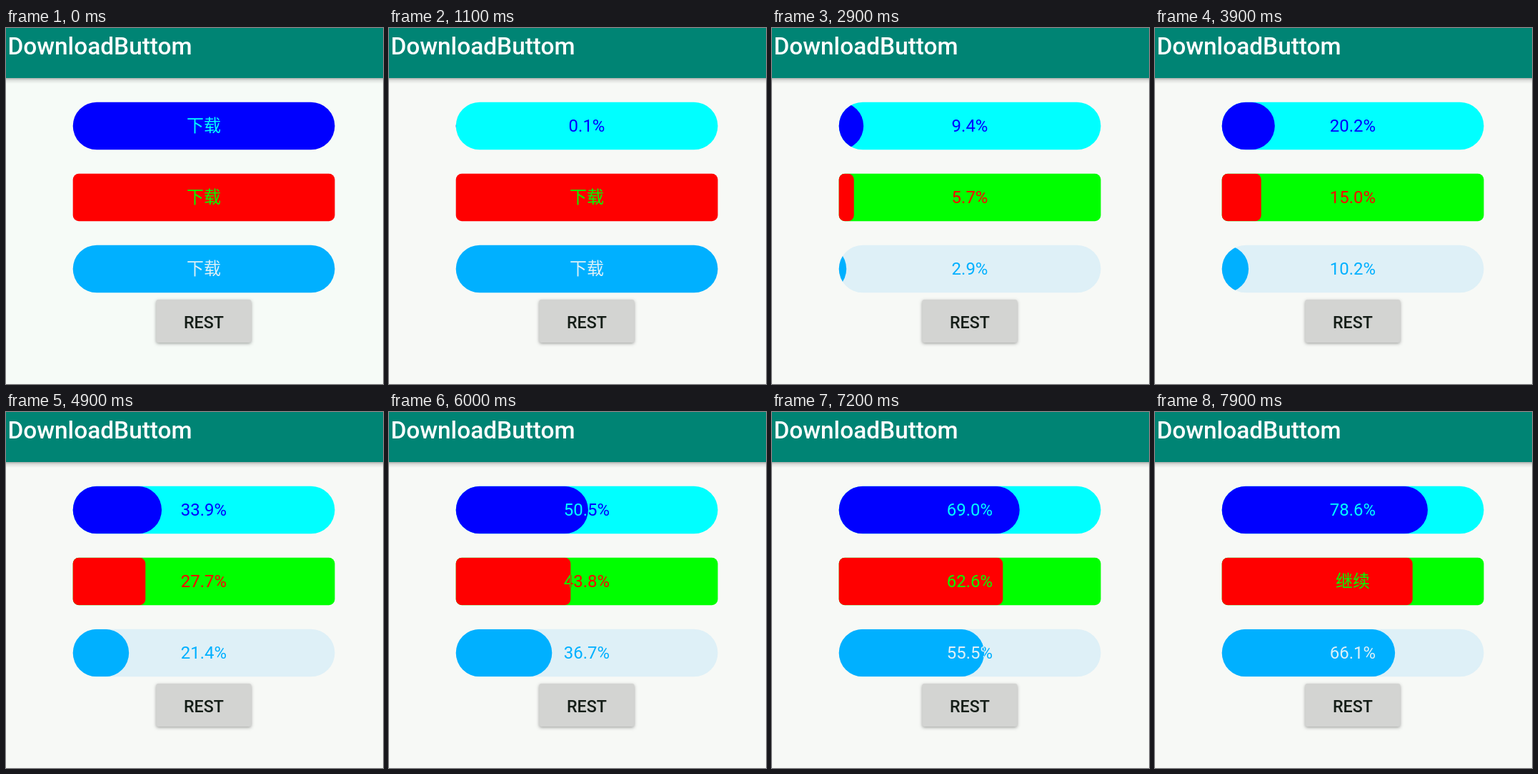
An HTML page with a canvas for the animation above (8 s loop, 528 by 498 pixels).

```html
<!DOCTYPE html>
<html lang="zh-CN">
<head>
<meta charset="utf-8">
<title>DownloadButtom</title>
<style>
html, body { margin: 0; width: 100%; height: 100%; overflow: hidden; background: #f7f9f6; }
canvas { display: block; }
</style>
</head>
<body>
<canvas id="stage" width="528" height="498"></canvas>
<script>
const ctx = document.getElementById('stage').getContext('2d');
const LOOP = 8000, STEP = 100;
const X = 93.7, W = 366.8, H = 66.6, MID = 277;
const FONT = 'Roboto, "Noto Sans CJK SC", "Noto Sans CJK", sans-serif';
const TIMES = [1800, 3900, 4900, 6000, 7200, 7900];

// Each bar eases from 0 to 100 percent; values are the readings at TIMES.
const bars = [
  { y: 103.7, r: 33.3, front: '#0000ff', back: '#00ffff', start: 890,
    values: [2, 20.2, 33.9, 50.5, 69, 78.6] },
  { y: 203.7, r: 8.3, front: '#ff0000', back: '#00ff00', start: 1350, pause: 7900,
    values: [0.5, 15, 27.7, 43.8, 62.6, 72.8] },
  { y: 303.7, r: 33.3, front: '#00b0ff', back: '#def0f7', start: 1800,
    values: [0, 10.2, 21.4, 36.7, 55.5, 66.1] }
];

const toPhase = v => Math.acos(1 - v / 50) / Math.PI;
const toValue = u => 50 * (1 - Math.cos(Math.PI * u));

for (const bar of bars) {
  bar.keys = TIMES.map((t, i) => [t, toPhase(bar.values[i])]);
  if (bar.start < TIMES[0]) bar.keys.unshift([bar.start, 0]);
}

function percentAt(keys, t) {
  let i = 1;
  while (i < keys.length - 1 && t > keys[i][0]) i++;
  const [t0, u0] = keys[i - 1], [t1, u1] = keys[i];
  return toValue(u0 + (u1 - u0) * (t - t0) / (t1 - t0));
}

function roundRect(x, y, w, h, r) {
  ctx.beginPath();
  ctx.roundRect(x, y, w, h, r);
}

function text(str, x, y, size, color, weight = 400, align = 'center') {
  ctx.font = `${weight} ${size}px ${FONT}`;
  ctx.textAlign = align;
  ctx.fillStyle = color;
  ctx.fillText(str, x, y);
}

function clipped(x, w, draw) {
  ctx.save();
  ctx.beginPath();
  ctx.rect(x, 0, w, 498);
  ctx.clip();
  draw();
  ctx.restore();
}

function drawBar(bar, t) {
  const { y, r, front, back } = bar;
  const idle = t < bar.start;
  const percent = idle ? 100 : percentAt(bar.keys, t);
  const label = idle ? '下载' : t >= bar.pause ? '继续' : percent.toFixed(1) + '%';
  const fill = W * percent / 100, edge = X + fill;

  roundRect(X, y, W, H, r);
  ctx.fillStyle = idle ? front : back;
  ctx.fill();
  if (!idle) {
    // The fill is the whole bar shape slid left, seen through the bar itself.
    ctx.save();
    ctx.clip();
    roundRect(edge - W, y, W, H, r);
    ctx.fillStyle = front;
    ctx.fill();
    ctx.restore();
  }

  const base = y + H / 2 + 8.2;
  clipped(X, fill, () => text(label, MID, base, 24, back));
  clipped(edge, W - fill, () => text(label, MID, base, 24, front));
}

function drawHeader() {
  const shade = ctx.createLinearGradient(0, 70, 0, 78);
  shade.addColorStop(0, 'rgba(0,0,0,0.3)');
  shade.addColorStop(0.4, 'rgba(0,0,0,0.1)');
  shade.addColorStop(1, 'rgba(0,0,0,0)');
  ctx.fillStyle = shade;
  ctx.fillRect(0, 70, 528, 8);
  ctx.fillStyle = '#008474';
  ctx.fillRect(0, 0, 528, 70);
  text('DownloadButtom', 2.4, 37, 33.4, '#ffffff', 500, 'left');
}

function drawReset() {
  ctx.save();
  ctx.shadowColor = 'rgba(0,0,0,0.35)';
  ctx.shadowBlur = 4;
  ctx.shadowOffsetY = 1.5;
  roundRect(210.3, 380, 133.2, 60, 3.3);
  ctx.fillStyle = '#d3d4d2';
  ctx.fill();
  ctx.restore();
  text('REST', MID, 419.7, 23.3, '#141d17', 500);
}

function draw(t) {
  ctx.fillStyle = t < 900 ? '#f6fbf7' : '#f7f9f6';
  ctx.fillRect(0, 0, 528, 498);
  drawHeader();
  for (const bar of bars) drawBar(bar, t);
  drawReset();
}

const origin = performance.now();
function tick() {
  const t = (performance.now() - origin) % LOOP;
  draw(Math.floor(t / STEP) * STEP);
  requestAnimationFrame(tick);
}
tick();
</script>
</body>
</html>
```
